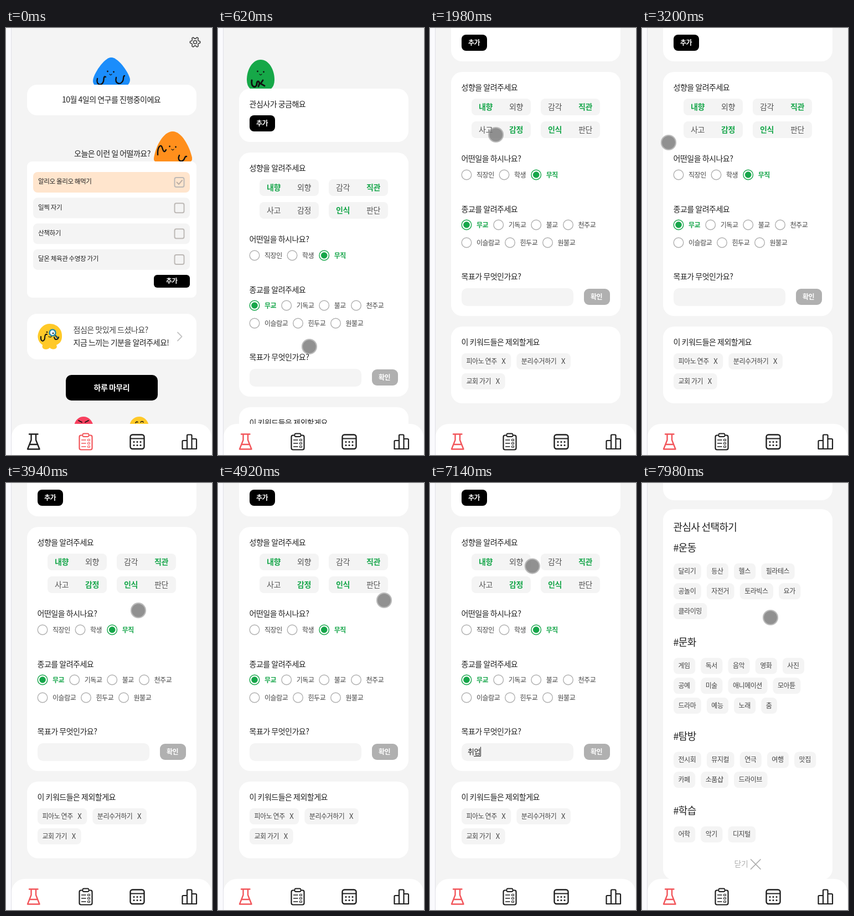
These frames come from a looping animation (372x768 px, 8 s). An HTML page with a canvas:

```html
<!DOCTYPE html>
<html lang="ko">
<head>
<meta charset="utf-8">
<style>
html, body { margin: 0; width: 100%; height: 100%; overflow: hidden; background: #f4f4f4; }
canvas { display: block; width: 372px; height: 768px; }
</style>
</head>
<body>
<canvas id="stage" width="372" height="768"></canvas>
<script>
const ctx = document.getElementById('stage').getContext('2d');
const LOOP = 8000, MAX_SCROLL = 145;
const BG = '#f4f4f4', INK = '#202020', SOFT = '#444', GREEN = '#16a64a', RED = '#f2555a', GREY = '#b0b0b0';

function box(x, y, w, h, r, fill, stroke, line = 2) {
  ctx.beginPath();
  ctx.roundRect(x, y, w, h, r);
  if (fill) { ctx.fillStyle = fill; ctx.fill(); }
  if (stroke) { ctx.strokeStyle = stroke; ctx.lineWidth = line; ctx.stroke(); }
}

function disc(x, y, r, fill, stroke, line = 1.4) {
  ctx.beginPath();
  ctx.arc(x, y, r, 0, Math.PI * 2);
  if (fill) { ctx.fillStyle = fill; ctx.fill(); }
  if (stroke) { ctx.strokeStyle = stroke; ctx.lineWidth = line; ctx.stroke(); }
}

function shape(d, fill) {
  ctx.fillStyle = fill;
  ctx.fill(new Path2D(d));
}

function line(d, color = '#111', width = 2) {
  ctx.strokeStyle = color;
  ctx.lineWidth = width;
  ctx.lineCap = ctx.lineJoin = 'round';
  ctx.stroke(new Path2D(d));
}

function setFont(size, weight) {
  ctx.font = `${weight} ${size}px "Noto Sans CJK KR", "Noto Sans CJK", sans-serif`;
  ctx.letterSpacing = `${-0.036 * size}px`;
}

// y is the visual middle of the line
function text(s, x, y, size = 14, weight = 500, color = INK) {
  setFont(size, weight);
  ctx.fillStyle = color;
  ctx.fillText(s, x, y + size * 0.38);
  return ctx.measureText(s).width;
}

const smooth = u => u * u * (3 - 2 * u);

// keys: [time, ...values]
function track(keys, t) {
  if (t <= keys[0][0]) return keys[0].slice(1);
  const i = keys.findIndex(k => k[0] > t);
  if (i < 0) return keys[keys.length - 1].slice(1);
  const a = keys[i - 1], b = keys[i], u = smooth((t - a[0]) / (b[0] - a[0]));
  return a.slice(1).map((v, n) => v + (b[n + 1] - v) * u);
}

const POINTER = [
  [20, 0, 705], [300, 50, 744], [440, 50, 744], [800, 278, 405], [1100, 278, 405],
  [1640, 118, 205], [1680, 118, 199], [1960, 118, 199], [1980, 119, 192],
  [2240, 324, 165], [2420, 291, 147], [2690, 291, 147], [2940, 228, 231], [3090, 228, 231],
  [3200, 48, 206], [3260, 48, 206], [3500, 290, 146], [3700, 205, 280], [3900, 251, 232],
  [4120, 119, 201], [4290, 119, 201], [4380, 309, 203], [4690, 309, 202], [4920, 300, 211],
  [5500, 217, 505], [5520, 213, 504], [5790, 213, 504], [5820, 210, 491], [6290, 210, 491],
  [6480, 290, 518], [6640, 352, 250], [6800, 90, 24], [7000, 172, 116], [7110, 172, 116],
  [7280, 318, 499], [7510, 318, 499], [7680, 80, 27], [7740, 80, 27], [7980, 232, 242]
];
const SCROLL = [[830, 0], [1000, 99], [1240, MAX_SCROLL]];
const TYPED = [[5970, 'ㅊ'], [6020, '추'], [6070, '취'], [6140, '취ㅇ'], [6300, '취어'], [6400, '취업']];
const OPEN_HOME = 380, PICK = 1970, OPEN_LIST = 7700;

function drawGear() {
  let d = '';
  for (let i = 0; i < 48; i++) {
    const a = i / 48 * Math.PI * 2, r = 7.8 + 1.4 * Math.tanh(3 * Math.cos(a * 6 + Math.PI));
    d += `${i ? 'L' : 'M'}${341.5 + r * Math.sin(a)} ${25.5 - r * Math.cos(a)}`;
  }
  line(d + 'Z', '#444', 1.6);
  disc(341.5, 25.5, 3, null, '#444', 1.6);
}

function face(x, y) {
  disc(x - 5.5, y - 1, 1.4, '#111');
  disc(x + 5.5, y, 1.4, '#111');
  line(`M${x - 2} ${y + 4}q2 3 4 0`, '#111', 1.3);
}

function drawHome() {
  drawGear();
  shape('M190 53C204 53 224 84 224 93C224 106 206 110 190 110C172 110 157 107 157 95C157 84 177 53 190 53Z', '#1b8dfb');
  face(189, 79);
  line('M165 91C162 103 173 105 176 96C177 91 176 86 180 88', '#111', 2.4);
  line('M199 89C196 101 207 103 211 95C213 91 211 86 214 86', '#111', 2.4);
  box(38, 102, 306, 55, 18, '#fff');
  text('10월 4일의 연구를 진행중이에요', 101, 129);

  shape('M301 186C317 186 331 212 336 233Q337 241 330 241H273Q266 241 267 234C270 213 284 186 301 186Z', '#ff8f1c');
  face(301, 214);
  line('M274 228C273 213 280 208 282 215C284 222 286 225 289 219', '#111', 2.4);
  line('M313 229C309 237 315 242 320 238C324 235 322 230 326 231', '#111', 2.4);
  text('오늘은 이런 일 어떨까요?', 123, 226);
  box(38, 240, 306, 245, 9, '#fff');
  ['알리오 올리오 해먹기', '일찍 자기', '산책하기', '달온 체육관 수영장 가기'].forEach((s, i) => {
    const y = 259 + i * 46.3;
    box(49, y, 283, 37, 8, i ? BG : '#ffe5cd');
    text(s, 58, y + 17, 11.6);
    box(304.5, y + 10, 17, 17, 3, null, '#bdb9b6');
  });
  line('M308.5 277.5l3.5 3.5l6-7', '#bdb0a6');
  box(267, 444, 65, 23, 6, '#000');
  text('추가', 289, 455, 11.6, 700, '#fff');

  box(38, 514, 306, 82, 18, '#fff');
  shape('M79 532C93 532 102 543 101 555C101 564 96 568 91 570C95 578 83 580 79 575C75 580 63 579 66 570C59 566 56 557 58 550C61 539 69 532 79 532Z', '#ffc928');
  line('M63 555C62 566 69 564 70 558C70 553 71 550 74 551', '#111');
  line('M87 556C88 562 94 561 95 556', '#111');
  line('M88 552l5 5', '#22566a', 2.6);
  disc(84, 548, 5.6, '#e8f7fb', '#2389a8', 2.4);
  disc(74, 547, 1.3, '#111');
  disc(85, 549, 1.3, '#111');
  line('M77 555q3 2 5 0', '#111', 1.2);
  text('점심은 맛있게 드셨나요?', 121.5, 543, 14, 300, '#444');
  text('지금 느끼는 기분을 알려주세요!', 121.5, 566);
  line('M310 547.5l7.5 7.5l-7.5 7.5', '#c4c4c4', 1.8);

  box(108, 624, 166, 46, 10, '#000');
  text('하루 마무리', 158.5, 647, 14, 700, '#fff');
  shape('M123 716C124 705 132 699 140 699C149 699 156 706 158 716Z', '#f8415f');
  line('M131 706l6 3M149 706l-6 3', '#111', 1.8);
  shape('M223 716C224 705 232 699 241 699C249 699 257 706 258 716Z', '#ffc928');
  line('M234 710q2-3 4-1M243 709q3-3 5 0', '#111', 1.6);
}

function addButton(y) {
  box(57, y, 46, 29, 8, '#000');
  text('추가', 69, y + 14, 12, 700, '#fff');
}

function chip(s, x, y, closable) {
  setFont(12, 400);
  const w = ctx.measureText(s).width + 18 + (closable ? 16 : 0);
  box(x, y, w, 29, 8, BG);
  text(s, x + 8.5, y + 14, 12, 400, SOFT);
  if (closable) text('X', x + w - 17, y + 14, 13, 400, SOFT);
  return x + w + 10;
}

function pill(x, y, names, chosen) {
  box(x, y, 107, 30, 8, BG);
  names.forEach((s, i) => {
    const on = i === chosen;
    text(s, x + 13 + i * 55, y + 14.5, 14, on ? 700 : 300, on ? GREEN : '#555');
  });
}

function radios(y, items, chosen) {
  items.forEach(([s, x], i) => {
    const on = i === chosen;
    disc(x, y, 8.8, '#fff', on ? GREEN : GREY);
    if (on) disc(x, y, 5.8, GREEN);
    text(s, x + 18, y, 12, on ? 700 : 400, on ? GREEN : SOFT);
  });
}

function drawGoalInput(t) {
  box(57, 468, 202, 32, 10, BG);
  const typed = TYPED.filter(k => k[0] <= t).pop();
  if (typed) {
    const s = typed[1], end = 68 + text(s, 68, 483, 13, 400);
    setFont(13, 400);
    const from = end - ctx.measureText(s.slice(-1)).width;
    line(`M${from} 491.5H${end}`, INK, 1);
    line(`M${end + 0.5} 475V491`, INK, 1);
  } else if (t >= 5660 && t < 5800) {
    line('M68.5 475.5V491.5', INK, 1);
  }
  box(278, 469, 47, 29, 9, GREY);
  text('확인', 290, 483, 12, 700, '#fff');
}

function drawResearch(t) {
  const [scroll] = track(SCROLL, t);
  ctx.save();
  ctx.translate(0, MAX_SCROLL - scroll);
  shape('M77 -88C92 -88 102 -70 102 -52Q102 -30 77 -30Q52 -30 52 -52C52 -70 62 -88 77 -88Z', '#16a848');
  face(77, -66);
  line('M61 -51C59 -38 69 -36 70 -44C70 -50 74 -51 75 -45L73 -40', '#111', 3);
  line('M81 -51L77 -45L84 -41', '#111', 3);
  box(38, -36, 306, 96, 20, '#fff');
  text('관심사가 궁금해요', 56.5, -8);
  addButton(12);

  box(38, 79, 306, 439, 20, '#fff');
  text('성향을 알려주세요', 56.5, 107);
  pill(75, 127, ['내향', '외향'], 0);
  pill(200, 127, ['감각', '직관'], 1);
  pill(75, 168, ['사고', '감정'], t >= PICK ? 1 : -1);
  pill(200, 168, ['인식', '판단'], 0);
  text('어떤일을 하시나요?', 56.5, 235);
  radios(264, [['직장인', 66], ['학생', 134], ['무직', 191.7]], 2);
  text('종교를 알려주세요', 56.5, 326);
  radios(354, [['무교', 66], ['기독교', 123.7], ['불교', 191.7], ['천주교', 249.5]], 0);
  radios(386, [['이슬람교', 66], ['힌두교', 144.5], ['원불교', 212.5]]);
  text('목표가 무엇인가요?', 56.5, 447);
  drawGoalInput(t);

  box(38, 537, 306, 138, 20, '#fff');
  text('이 키워드들은 제외할게요', 56.5, 565);
  chip('분리수거하기', chip('피아노 연주', 57, 585, true), 585, true);
  chip('교회 가기', 57, 621, true);
  ctx.restore();

  const fade = Math.min(1, (t - 830) / 40, (1640 - t) / 200);
  if (fade > 0) {
    ctx.globalAlpha = fade;
    box(365, scroll * 122 / MAX_SCROLL, 2.2, 646, 1, '#a0a0a0');
    ctx.globalAlpha = 1;
  }
}

const TOPICS = [
  ['#운동', 116, ['달리기 등산 헬스 필라테스', '공놀이 자전거 토라빅스 요가', '클라이밍']],
  ['#문화', 286, ['게임 독서 음악 영화 사진', '공예 미술 애니메이션 모아튠', '드라마 예능 노래 춤']],
  ['#탐방', 455, ['전시회 뮤지컬 연극 여행 맛집', '카페 소품샵 드라이브']],
  ['#학습', 589, ['어학 악기 디지털']]
];

function drawTopics() {
  box(38, -40, 306, 71, 20, '#fff');
  box(38, 47, 306, 667, 20, '#fff');
  text('관심사 선택하기', 56.5, 79, 18);
  for (const [title, y, rows] of TOPICS) {
    text(title, 56.5, y, 18);
    rows.forEach((row, i) => row.split(' ').reduce((x, s) => chip(s, x, y + 28.5 + i * 35.8), 57));
  }
  text('닫기', 166.5, 685, 14, 500, GREY);
  line('M196.5 677l17.5 17.5M214 677l-17.5 17.5', '#a8a8a8', 1.6);
}

function drawNav(home) {
  box(10, 712, 361, 80, 24, '#fff');
  const flask = home ? INK : RED, board = home ? RED : INK;
  line('M42 730.5H57.5M45.5 731V741L39 757.5H60.5L54 741V731M43 749H56.5', flask, 2.4);
  box(132.5, 732.5, 23, 26, 3, null, board, 2.2);
  box(138.5, 729.5, 11, 5.5, 2, '#fff', board, 1.8);
  for (let y = 741; y < 757; y += 6) {
    line(`M136.5 ${y}H144`, board, 1.5);
    box(147.5, y - 1.5, 4, 3, 1, null, board, 1.2);
  }
  box(224.5, 731.5, 25, 25.5, 4, null, INK, 2.4);
  line('M225 738.5H249', INK, 2);
  for (let i = 0; i < 6; i++) disc(231 + i % 3 * 6, 744.5 + (i > 2) * 6, 1.6, INK);
  line('M318.5 757V743.5Q318.5 742 320 742H327M327 757V733Q327 731.5 328.5 731.5H334Q335.5 731.5 335.5 733V757M335.5 739H342.5Q344 739 344 740.5V757H318.5', INK, 2.2);
}

function drawPointer(t) {
  if (t < 20) return;
  const [x, y] = track(POINTER, t);
  disc(x, y, 12, 'rgba(110,110,110,.76)');
  disc(x, y, 12.7, null, 'rgba(150,150,150,.65)', 2.8);
}

function render(t) {
  ctx.fillStyle = BG;
  ctx.fillRect(0, 0, 372, 768);
  const home = t < OPEN_HOME;
  if (home) drawHome();
  else if (t < OPEN_LIST) drawResearch(t);
  else drawTopics();
  drawNav(home);
  ctx.fillStyle = '#fafafd';
  ctx.fillRect(0, 0, 9, 768);
  ctx.fillStyle = '#e0e0e8';
  ctx.fillRect(9, 0, 1, 768);
  drawPointer(t);
}

const start = performance.now();
function tick() {
  render((performance.now() - start) % LOOP);
  requestAnimationFrame(tick);
}
tick();
</script>
</body>
</html>
```
